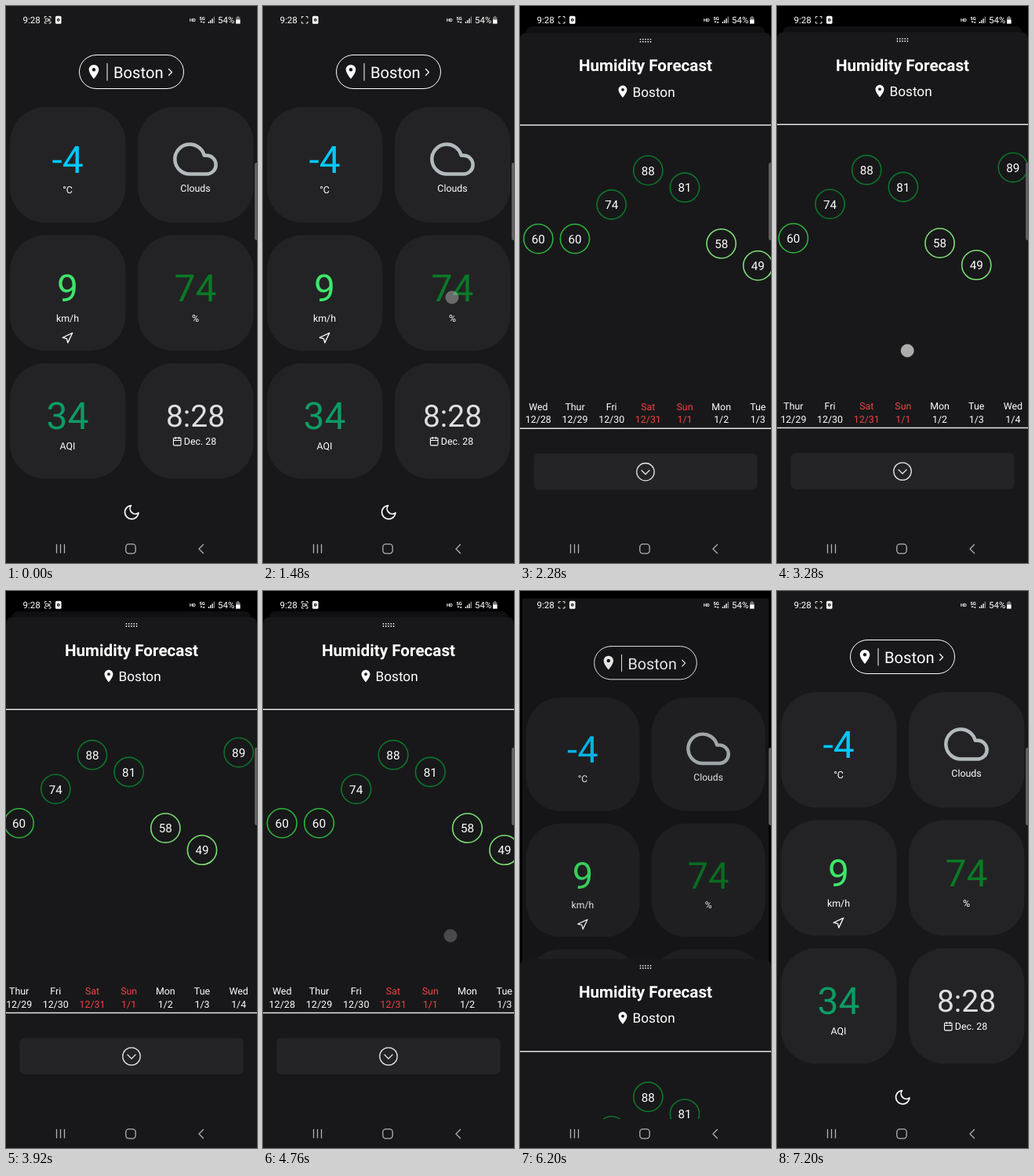
Animation of 320 by 711 pixels, one loop 7.32 s. Source, as an HTML page:

```html
<!DOCTYPE html>
<html lang="en">
<head>
<meta charset="utf-8">
<title>Weather forecast sheet</title>
<style>
  html, body { margin: 0; width: 100%; height: 100%; overflow: hidden; background: #000; }
  svg { display: block; width: 100%; height: 100%; font-family: Roboto, sans-serif; text-rendering: geometricPrecision; }
  text { fill: #fff; }
  .mid { text-anchor: middle; }
  .label { font-size: 12.4px; }
  .line { fill: none; stroke: #fff; stroke-linecap: round; stroke-linejoin: round; }
</style>
</head>
<body>
<svg viewBox="0 0 320 711">
  <defs>
    <clipPath id="homeClip"><rect id="homeShape" width="320" height="711"/></clipPath>
    <path id="pin" fill="#fff" d="M0-10C-3.87-10-7-6.87-7-3c0 5.25 7 13 7 13s7-7.75 7-13c0-3.87-3.13-7-7-7zm0 9.5a2.5 2.5 0 1 1 0-5 2.5 2.5 0 0 1 0 5z"/>
  </defs>
  <rect width="320" height="711"/>

  <g id="home" clip-path="url(#homeClip)">
    <rect width="320" height="711" fill="#18181a"/>
    <rect class="line" x="93.5" y="62.5" width="133" height="43" rx="21.5"/>
    <use href="#pin" transform="translate(112 84) scale(.9)"/>
    <path class="line" d="M129 73.5V95" stroke-width="1"/>
    <text x="137" y="92" font-size="20.2">Boston</text>
    <path class="line" d="M207.5 80.5l4 4-4 4" stroke-width="1.2"/>
    <g id="cards" fill="#232325"></g>
    <g id="readings" class="mid"></g>
    <path class="line" transform="translate(213 167) scale(2.375)" style="stroke:#b3babb" stroke-width="1.9" d="M18 10h-1.26A8 8 0 1 0 9 20h9a5 5 0 0 0 0-10z"/>
    <path class="line" transform="translate(70.2 416) scale(.66)" stroke-width="2" d="M3 11L22 2l-9 19-2-8z"/>
    <path class="line" transform="translate(211.9 549.2) scale(.53)" stroke-width="2" d="M5 4h14a2 2 0 0 1 2 2v14a2 2 0 0 1-2 2H5a2 2 0 0 1-2-2V6a2 2 0 0 1 2-2zM16 2v4M8 2v4M3 10h18"/>
    <path class="line" transform="translate(148.6 634.6) scale(.97)" stroke-width="1.8" d="M21 12.79A9 9 0 1 1 11.21 3 7 7 0 0 0 21 12.79z"/>
  </g>

  <g id="sheet">
    <rect y="33.5" width="320" height="740" rx="8" fill="#18181a"/>
    <path class="line" d="M153.5 41.8h14M153.5 44.9h14" stroke-width="1.7" stroke-dasharray="0 3.25"/>
    <text class="mid" x="160" y="82.6" font-size="20.7" font-weight="700">Humidity Forecast</text>
    <use href="#pin" transform="translate(131 108.5) scale(.78)"/>
    <text x="143.5" y="114.8" font-size="17.2">Boston</text>
    <path d="M0 151.3H320M0 538.5H320" stroke="#e4e4e4" stroke-width="1.5"/>
    <g id="chart" class="mid"></g>
    <rect id="button" x="17.5" y="570.5" width="285" height="46.5" rx="6.5"/>
    <g class="line" style="stroke:#e6e6e6" stroke-width="1.3">
      <circle cx="160" cy="594" r="11.2"/><path d="M155 592l5 5 5-5"/>
    </g>
  </g>

  <g id="system">
    <rect y="674" width="320" height="37" fill="#18181a"/>
    <g class="line" style="stroke:#b2b2b4" stroke-width="1.3">
      <path d="M64.5 687.5v10.5M69.5 687.5v10.5M74.5 687.5v10.5M251.5 687.5l-5.5 5.5 5.5 5.5"/>
      <rect x="152.8" y="686.8" width="12.4" height="12" rx="3.8"/>
    </g>
    <path d="M320 200h-1q-2 0-2 3v93q0 3 2 3h1z" fill="#606062"/>
    <text x="21.5" y="21.8" font-size="11.6">9:28</text>
    <path class="line" d="M49.3 15.5v-2h2M55 13.500h2v2M57 20v2h-2M51.300 22h-2v-2" stroke-width=".9"/>
    <path id="camera" class="line" d="M51 16.200h3v3.200h-3zM54.200 17.600l1.600-1v2.600z" stroke-width=".8"/>
    <rect x="63" y="12.800" width="7.500" height="10" rx="1.500" fill="#fff"/>
    <circle cx="66.750" cy="17.800" r="2" fill="#222"/><circle cx="66.750" cy="17.800" r=".7" fill="#fff"/>
    <text x="234" y="20" font-size="5.800" font-weight="700">HD</text>
    <text x="246.500" y="17.600" font-size="5.800" font-weight="700">5G</text>
    <path d="M247.500 21l1.500-2.500 1.500 2.500zM250.700 20l1.500 2.500 1.500-2.500z" fill="#ddd"/>
    <path d="M258.500 22v-2M260.800 22v-4M263.100 22v-6" stroke="#fff" stroke-width="1.300"/>
    <path d="M265.400 22v-8.500" stroke="#888" stroke-width="1.300"/>
    <text x="270" y="21.800" font-size="11.500">54%</text>
    <path d="M293 22.500v-8h1.500v-1.500h2.500v1.500h1.500v8z" fill="#777"/>
    <rect x="293" y="17.500" width="5.500" height="5" fill="#fff"/>
  </g>
  <circle id="touch" r="8.300" fill="#d2d2d2" stroke="#fff" stroke-opacity=".25"/>
</svg>

<script>
const LOOP = 7320, OPEN = 1778, CLOSE = 6080;
const SCREEN = 674, STATUS_BAR = 26, INSET = 7.8, MAX_SCROLL = 160 / 3;
const $ = id => document.getElementById(id);
const set = (el, attrs) => { for (const k in attrs) el.setAttribute(k, attrs[k]); };
const clamp = x => Math.min(1, Math.max(0, x));
const text = (x, y, value, size, color = '#fff') =>
  `<text x="${x}" y="${y}" font-size="${size}" style="fill:${color}">${value}</text>`;

const LEFT = 78.5, RIGHT = 241.5, LABEL = 12.4;
$('cards').innerHTML = [0, 1, 2, 3, 4, 5].map(i =>
  `<rect x="${i % 2 ? 168 : 5}" y="${129 + 163.5 * (i >> 1)}" width="147.500" height="147.500" rx="45"/>`).join('');
$('readings').innerHTML = [
  [LEFT, 213, '-4', 48, '#00c8ff'], [LEFT, 239, '°C', LABEL],
  [RIGHT, 237, 'Clouds', LABEL],
  [LEFT, 377, '9', 48, '#3ee66a'], [LEFT, 402.6, 'km/h', LABEL],
  [RIGHT, 377, '74', 48, '#0a7a25'], [RIGHT, 402.6, '%', LABEL],
  [LEFT, 540.300, '34', 48, '#0d9b64'], [LEFT, 566, 'AQI', LABEL],
  [RIGHT, 537, '8:28', 39, '#dedee0'], [247.500, 560, 'Dec. 28', LABEL],
].map(item => text(...item)).join('');

const ringColor = v => v > 70 ? '#0d732b' : v > 59 ? '#2db43b' : '#7ddf76';
const forecast = [
  ['Wed', '12/28', 60], ['Thur', '12/29', 60], ['Fri', '12/30', 74], ['Sat', '12/31', 88],
  ['Sun', '1/1', 81], ['Mon', '1/2', 58], ['Tue', '1/3', 49], ['Wed', '1/4', 89],
];
$('chart').innerHTML = forecast.map(([day, date, value], i) => {
  const x = (i + .5) * 140 / 3, y = 296.400 - 3.115 * (value - 60);
  const color = day[0] === 'S' ? '#f04343' : '#fff';
  return `<circle cx="${x}" cy="${y}" r="18.600" fill="none" stroke="${ringColor(value)}" stroke-width="1.600"/>`
    + text(x, y + 5.800, value, 15.200)
    + text(x, 515.300, day, LABEL, color) + text(x, 531.500, date, LABEL, color);
}).join('');

// Critically damped spring from 0 to 1
function spring(ms) {
  const u = Math.max(0, ms) * .01826;
  return 1 - (1 + u) * Math.exp(-u);
}
const easeOut = x => 1 - (1 - clamp(x)) ** 2;
// Edge stretch that rises quickly and then relaxes
function stretch(ms) {
  const u = Math.max(0, ms) / 80;
  return .013 * u * Math.exp(1 - u);
}

const touches = [
  { from: 1480, to: 1660, x0: 241, x1: 241, y: 372 },
  { from: 3120, to: 3360, x0: 240, x1: 130, y: 440 },
  { from: 4480, to: 4695, x0: 135, x1: 239, y: 440 },
  { from: 5800, to: 5985, x0: 179, x1: 179, y: 589 },
];

function drawSheet(t) {
  const p = t < CLOSE ? spring(t - OPEN) : 1 - spring(t - CLOSE);
  const scale = 1 - p * 2 * INSET / 320;
  const y = p * (STATUS_BAR - INSET * SCREEN / 320);
  set($('home'), {
    transform: `translate(160 ${337 + y}) scale(${scale}) translate(-160 -337)`,
    opacity: 1 - .3 * p,
  });
  set($('homeShape'), { rx: p * INSET });
  set($('sheet'), {
    transform: `translate(0 ${SCREEN * (1 - p)})`,
    visibility: p > .0005 ? 'visible' : 'hidden',
  });
}

function drawChart(t) {
  const scroll = MAX_SCROLL * (easeOut((t - 3130) / 210) - easeOut((t - 4490) / 180));
  const leftPull = stretch(t - 4660), rightPull = stretch(t - 3310);
  const shift = leftPull * 50 - rightPull * 320;
  set($('chart'), { transform: `translate(${shift} 0) scale(${1 + leftPull + rightPull} 1) translate(${-scroll} 0)` });
}

function drawTouch(t) {
  const touch = touches.find(d => t >= d.from && t < d.to + 100);
  if (!touch) return set($('touch'), { opacity: 0 });
  const { from, to, x0, x1, y } = touch;
  set($('touch'), {
    cx: x0 + (x1 - x0) * clamp((t - from) / (to - from)),
    cy: y,
    opacity: .8 * clamp((t - from + 30) / 60) * clamp(1 - (t - to) / 100),
  });
}

function render(t) {
  drawSheet(t);
  drawChart(t);
  drawTouch(t);
  const pressed = start => t >= start && t < start + 200;
  set($('cards').children[3], { fill: pressed(1560) ? '#4b4b4d' : '#232325' });
  set($('button'), { fill: pressed(5880) ? '#4b4b4d' : '#242426' });
  set($('camera'), { opacity: (t + 380) % 1000 < 500 ? 1 : 0 });
}

const begin = performance.now();
function frame() {
  render((performance.now() - begin) % LOOP);
  requestAnimationFrame(frame);
}
frame();
</script>
</body>
</html>
```
